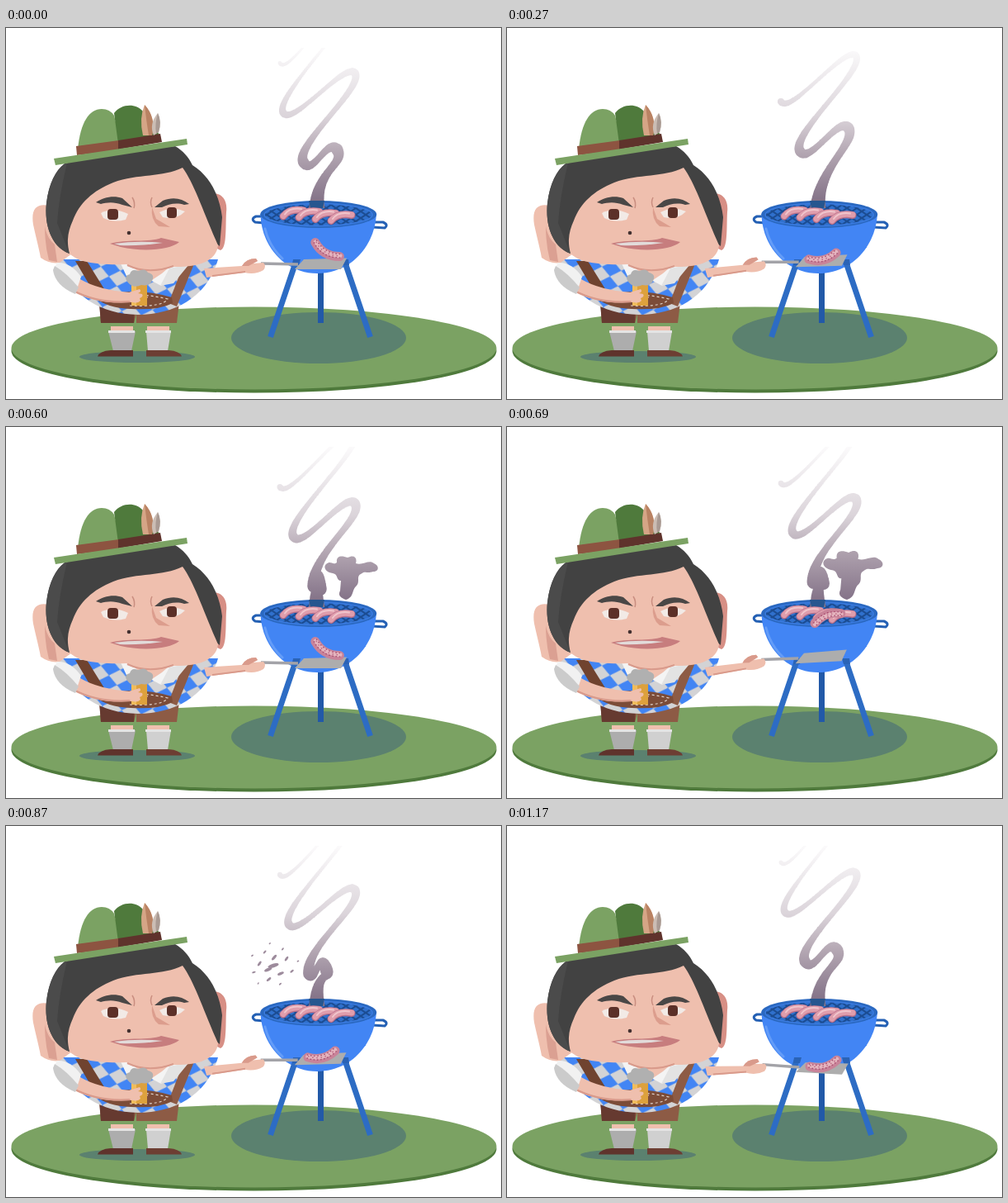
These frames come from a looping animation (600x449 px, 1.2 s). An HTML page:

```html
<!DOCTYPE html>
<html lang="en">
<head>
<meta charset="utf-8">
<title>Barbecue</title>
<style>
html, body { margin: 0; width: 100%; height: 100%; overflow: hidden; background: #fff; }
svg { display: block; width: 100vw; height: 100vh; }
</style>
</head>
<body>
<svg viewBox="0 0 600 449">
  <defs>
    <linearGradient id="haze" gradientUnits="userSpaceOnUse" x1="0" y1="24" x2="0" y2="208">
      <stop offset="0" stop-color="#fbfafb"/>
      <stop offset=".45" stop-color="#dbd4da"/>
      <stop offset=".7" stop-color="#b2a5b1"/>
      <stop offset="1" stop-color="#857489"/>
    </linearGradient>
    <pattern id="check" width="24" height="19" patternUnits="userSpaceOnUse" patternTransform="translate(4 3) rotate(12)">
      <rect width="24" height="19" fill="#d3d3d5"/>
      <path d="M12 0L24 9.500L12 19L0 9.500Z" fill="#4285f4"/>
    </pattern>
    <pattern id="mesh" width="12" height="8" patternUnits="userSpaceOnUse" patternTransform="translate(4 2)">
      <rect width="12" height="8" fill="#2f70cd"/>
      <path d="M0 0L12 8M12 0L0 8" stroke="#1b4c92" stroke-width="2"/>
    </pattern>
    <clipPath id="sky"><rect y="24" width="600" height="194"/></clipPath>
    <g id="link" fill="none" stroke-linecap="round">
      <path d="M-12 4Q-4 -6 13 -3" stroke="#b86f8a" stroke-width="9"/>
      <path d="M-12 3.500Q-4 -6.500 13 -3.500" stroke="#df9dac" stroke-width="7"/>
      <path d="M-10 1.500Q-4 -7 10 -5" stroke="#f0c5cc" stroke-width="2"/>
    </g>
  </defs>

  <ellipse cx="300.500" cy="391" rx="294" ry="50.500" fill="#4f7a3c"/>
  <ellipse cx="300.500" cy="387.500" rx="294" ry="50" fill="#7ba263"/>
  <ellipse cx="379" cy="375" rx="106" ry="31" fill="#5b816f"/>
  <ellipse cx="159" cy="398" rx="70" ry="7" fill="#5b816f"/>

  <!-- grill -->
  <path d="M381.500 285V357" stroke="#2259a8" stroke-width="7"/>
  <g fill="none" stroke="#2460b4" stroke-width="3">
    <path d="M312 228H303Q296 231 302 235L313 236"/>
    <path d="M444 235H457Q464 238 459 242L444 241"/>
  </g>
  <path d="M308.500 225C309 264 338 297 377 297C418 297 447 264 449 225Z" fill="#4285f4"/>
  <path d="M314 243Q319 264 335 279" fill="none" stroke="#639cf8" stroke-width="3" stroke-linecap="round"/>
  <path d="M352 281L320.500 374M410 281L441.500 374" stroke="#2d6cc4" stroke-width="7"/>
  <path d="M348 280H357L355 287H347ZM406 280H415L416 287H408Z" fill="#2a63b6"/>
  <ellipse cx="378.700" cy="225.500" rx="70.500" ry="16.500" fill="#2a68c0"/>
  <ellipse cx="378.700" cy="226" rx="65.500" ry="13.500" fill="url(#mesh)" stroke="#3a7be0" stroke-width="1.500"/>

  <g clip-path="url(#sky)" fill="url(#haze)">
    <path id="smoke"/>
    <path id="puff" d="M412 209C403 206 403 202 405 198L406 186C400 186 403 178 396 177C388 176 384 170 388 166C394 161 396 168 401 164C400 156 406 155 414 158C422 154 426 158 424 165C432 168 440 160 446 165C453 168 452 175 445 175C436 178 436 173 430 178C424 181 430 188 424 193C419 198 422 206 412 209Z"/>
    <g id="drops"></g>
  </g>
  <path d="M367 209H386L384 218H369Z" fill="#26568f"/>
  <use href="#link" x="348" y="224"/>
  <use href="#link" x="367" y="225.500"/>
  <use href="#link" x="387" y="227.500"/>
  <use href="#link" x="406" y="229.500"/>

  <!-- legs -->
  <path d="M127 355H154V370H127ZM171 355H198V370H171Z" fill="#efbfae"/>
  <path d="M124 367H157L152 391H130Z" fill="#adadad"/>
  <path d="M170 367H200L196 391H172Z" fill="#d0d0d0"/>
  <path d="M124 366H156V369H124ZM169 366H200V369H169Z" fill="#e4e4e4"/>
  <path d="M111 397.500Q113 391 127 390H154V397.500Z" fill="#5f332c"/>
  <path d="M170 397.500V390H197Q211 391 213 397.500Z" fill="#6d3e33"/>
  <path d="M113 332H210L207 357H158V346L155 357H115Z" fill="#8d5b45"/>
  <path d="M113 332H156L155 357H115Z" fill="#663a30"/>
  <path d="M123 357H157V361H123ZM169 357H200V361H169Z" fill="#7ba263"/>

  <!-- shirt -->
  <path d="M60 280C82 326 114 346 160 347C204 347 244 326 257 280Z" fill="url(#check)"/>
  <path d="M84 282L98 282L126 327L113 331Z" fill="#70432f"/>
  <path d="M216 284L229 283L207 337L197 333Z" fill="#8d5b45"/>
  <path d="M108 326Q154 312 201 326L202 333Q185 342 151 340Q122 339 108 326Z" fill="#7c4c38"/>
  <path d="M116 326Q154 318 196 328Q190 338 150 336" fill="none" stroke="#ded0c8" stroke-width="1.200" stroke-dasharray="3 3"/>
  <path d="M139 285L150 309L169 302L188 312L220 286Z" fill="#f4f4f4"/>
  <path d="M187 312L198 291L222 286L203 309Z" fill="#e3e3e3"/>
  <path d="M148 284H204L189 297L174 307Z" fill="#efbfae"/>

  <!-- serving arm -->
  <g id="arm">
    <path d="M309 285L354 286" stroke="#a3a3a8" stroke-width="3.500"/>
    <path d="M350 292L361 280L413 278.500L406 292Z" fill="#adadad"/>
    <path d="M240 291L286 288Q291 279 303 279L305 282L299 285L312 284Q316 288 312 293Q302 299 289 296L243 302Z" fill="#efbfae"/>
    <path d="M286 288Q291 279 303 279L305 282L294 288Z" fill="#d99a8b"/>
    <path d="M250 300L290 295" stroke="#d99a8b" stroke-width="2"/>
  </g>
  <g id="sausage" fill="none" stroke-linecap="round">
    <path d="M-17 -2Q0 7 17 -4" stroke="#c98399" stroke-width="11"/>
    <path d="M-17 -3Q0 5 17 -5" stroke="#e4b4be" stroke-width="5"/>
    <path d="M-18 -1Q0 9 18 -3M-17 -5Q0 3 16 -7" stroke="#a94f70" stroke-width="1.600" stroke-dasharray=".2 4"/>
    <path d="M-16 -3Q0 6 17 -5" stroke="#bd6a86" stroke-width="1.600" stroke-dasharray=".2 5"/>
  </g>

  <!-- head -->
  <path d="M248 200C260 199 269 206 267 223C266 239 268 266 260 269L250 264Z" fill="#d78f85"/>
  <path d="M52 215C37 212 30 219 33 238C36 252 40 267 42 278Q53 286 65 284L80 273Z" fill="#efbfae"/>
  <path d="M47 240Q50 255 59 262L62 283L52 281Q47 262 47 240Z" fill="#dba092"/>
  <path d="M77 273C57 266 46 242 49 212C52 188 60 172 71 164L130 150L205 143C214 148 222 157 226 166C247 179 259 203 262 229L259 264L242 250L88 260Z" fill="#424242"/>
  <path d="M77 273C57 266 46 242 49 212C52 188 60 172 74 163Q64 205 62 236Z" fill="#4b4b4b"/>
  <path d="M77 273C73 258 75 246 81 233C89 212 105 197 130 187C160 176 190 181 214 169C228 188 239 222 257 263C255 281 236 290 201 289Q187 295 174 291Q158 295 146 286C112 287 88 284 77 273Z" fill="#efbfae"/>
  <path d="M147 287Q173 299 203 288" fill="none" stroke="#d99a8b" stroke-width="2"/>

  <!-- face -->
  <path d="M109 211C118 205 130 202 141 206L153 217L141 214C131 210 122 211 115 213Z" fill="#4a4746"/>
  <path d="M180 217L190 209C202 204 213 206 222 213L216 214C207 211 197 213 189 217Z" fill="#4a4746"/>
  <path d="M115 224Q130 216 148 225L145 232Q130 236 118 230Z" fill="#f2eae6"/>
  <path d="M186 223Q201 215 217 222Q206 233 190 229Z" fill="#f2eae6"/>
  <rect x="123" y="219" width="13" height="13" rx="4" fill="#5c3028"/>
  <rect x="195" y="217" width="12" height="13" rx="4" fill="#5c3028"/>
  <path d="M153 205Q157 211 155 218M177 205Q174 211 177 217" fill="none" stroke="#c98e80" stroke-width="1.500"/>
  <path d="M177 217L182 231L199 241L185 240Q175 232 177 217Z" fill="#dc9d8d"/>
  <circle cx="149" cy="248" r="2.300" fill="#433030"/>
  <path d="M126 261C146 255 174 260 188 254L210 259C199 269 165 271 139 265Z" fill="#c77d7e"/>
  <path d="M131 261Q160 257 190 260Q160 264 138 263Z" fill="#e2dbda"/>

  <!-- hat -->
  <path d="M87 147C90 114 101 98 116 98Q126 98 131 106L140 141Z" fill="#7ba263"/>
  <path d="M131 103C139 92 157 90 166 101Q178 111 186 130L136 140Z" fill="#4f7a3c"/>
  <path d="M85 143L137 136V148L86 154Z" fill="#8d5441"/>
  <path d="M136 136L187 128L189 138L136 147Z" fill="#5f332c"/>
  <path d="M58 158L219 134L220 141L60 166Z" fill="#7ba263"/>
  <path d="M168 93Q161 109 166 130L177 130Q182 108 168 93Z" fill="#d5a586"/>
  <path d="M168 93Q170 112 173 130L177 130Q182 108 168 93Z" fill="#b98263"/>
  <path d="M184 103Q173 116 179 130L185 126Q189 113 184 103Z" fill="#cbbdb4"/>
  <path d="M184 103Q180 117 182 128L185 126Q189 113 184 103Z" fill="#a99a93"/>

  <!-- drinking arm -->
  <path d="M72 306L90 304Q112 317 150 320L165 315L172 326Q166 334 152 332Q106 335 76 316Z" fill="#efbfae"/>
  <path d="M82 318Q112 334 151 331" fill="none" stroke="#d99a8b" stroke-width="2"/>
  <path d="M62 284Q78 283 91 301L84 322Q60 312 57 293Z" fill="#f1f1f1"/>
  <path d="M59 288Q73 296 88 314L84 322Q60 312 57 293Z" fill="#cbcbcb"/>
  <path d="M152 310H171V336H152Z" fill="#dda13d"/>
  <path d="M152 310H158V336H152Z" fill="#f0bd5d"/>
  <path d="M147 307Q142 300 150 298Q152 291 160 294Q169 290 172 296Q181 298 177 306Q174 313 164 311Q154 316 147 307Z" fill="#b0b0b0"/>
  <path d="M149 320L162 316Q165 319 160 321L165 322Q167 325 162 327L163 330Q158 335 149 330Z" fill="#efbfae"/>
</svg>
<script>
const LOOP = 1200, STEP = 30, BORN = 450, SPAN = 3600;
const $ = id => document.getElementById(id);
const ramp = (t, from, to) => Math.min(1, Math.max(0, (t - from) / (to - from)));
const ease = (t, from, to) => { const u = ramp(t, from, to); return u * u * (3 - 2 * u); };

// Each bend leaves the fire at BORN and climbs; its curve opens as it grows.
function bend(age, right) {
  const u = age - BORN, grown = ramp(u, 0, 750);
  const surge = 10 * Math.exp(-(((age - 1700) / 350) ** 2));
  return {
    x: right ? 378 + 45 * ramp(u, 0, LOOP) ** 1.4 : Math.max(332, 376 - 0.0205 * u),
    y: right ? 207 - 0.078 * u - surge : 200 - 0.05 * u,
    r: (right ? 7.5 : 7) * (1.25 - age / 4000),
    dx: -12 * grown,
    dy: -45 + (right ? 30 : 25) * grown,
    back: 4 + 14 * grown
  };
}

// The ribbon is a chain of discs of varying size along S-shaped curves.
function smokePath(t) {
  const pts = [{ x: 377, y: 222, r: 10, dx: -3, dy: -50 }];
  for (let age = t < BORN ? t + LOOP : t; age <= SPAN; age += LOOP)
    pts.push(bend(age, true), bend(age, false));
  let d = "";
  for (let i = 1; i < pts.length; i++) {
    const a = pts[i - 1], b = pts[i], n = 90;
    const cubic = (p, q, s, w, u) => (1 - u) ** 3 * p + 3 * (1 - u) ** 2 * u * q + 3 * (1 - u) * u * u * s + u ** 3 * w;
    for (let j = 0; j <= n; j++) {
      const u = j / n;
      const x = cubic(a.x, a.x + a.dx, b.x + 0.6 * b.back, b.x, u);
      const y = cubic(a.y, a.y + a.dy, b.y + b.back, b.y, u);
      const r = (a.r + (b.r - a.r) * u) * (1 - 0.45 * Math.sin(Math.PI * u));
      const arc = w => `a${r.toFixed(2)} ${r.toFixed(2)} 0 1 0 ${w.toFixed(2)} 0`;
      d += `M${(x - r).toFixed(2)} ${y.toFixed(2)}` + arc(2 * r) + arc(-2 * r);
    }
  }
  return d;
}

function seeded(seed) {
  return () => (seed = (seed * 16807) % 2147483647) / 2147483647;
}

// Drops fly out from the grill; those near the middle are the largest.
function splash(t) {
  if (t < 720 || t > 900) return "";
  const rnd = seeded(77), fly = 0.45 + 0.55 * ramp(t, 720, 810), size = 1 - ramp(t, 810, 910);
  let out = "";
  for (let i = 0; i < 16; i++) {
    const dir = i * 2.4, far = Math.sqrt(i / 16);
    const x = 340 + (-16 + 34 * far * Math.cos(dir)) * fly;
    const y = 207 + (-38 + 28 * far * Math.sin(dir)) * fly;
    const rx = (3 + 14 * (1 - far) ** 1.5 + 2 * rnd()) * size;
    out += `<ellipse cx="${x}" cy="${y}" rx="${rx}" ry="${rx * 0.3 + size}" transform="rotate(${-10 - 45 * rnd()} ${x} ${y})" fill="#9d8b9c"/>`;
  }
  return out;
}

function draw(t) {
  const c = (t + 30) % 600;
  const turn = 3 - 6 * (ease(c, 0, 60) - ease(c, 255, 390));
  const angle = -10 + 360 * ramp(c, 0, 250);
  const arm = `rotate(${turn} 240 297)`;
  $("arm").setAttribute("transform", arm);

  // Tossed sausage falls freely until it meets the spatula again.
  const airborne = c >= 30 && c < 265;
  $("sausage").setAttribute("transform", airborne
    ? `translate(388 ${227 + 0.00344 * (c - 142.6) ** 2}) rotate(${angle})`
    : `${arm} translate(383.4 282.5) rotate(${angle - turn})`);

  $("smoke").setAttribute("d", smokePath(t));
  const grow = 0.4 + 0.6 * ramp(t, 540, 600) + 0.12 * ramp(t, 600, 690);
  $("puff").setAttribute("transform", `translate(412 209) scale(${grow}) translate(-412 -209)`);
  $("puff").style.display = t >= 555 && t < 700 ? "" : "none";
  $("drops").innerHTML = splash(t);
}

function tick() {
  draw(Math.floor(performance.now() % LOOP / STEP) * STEP);
  requestAnimationFrame(tick);
}
tick();
</script>
</body>
</html>
```
